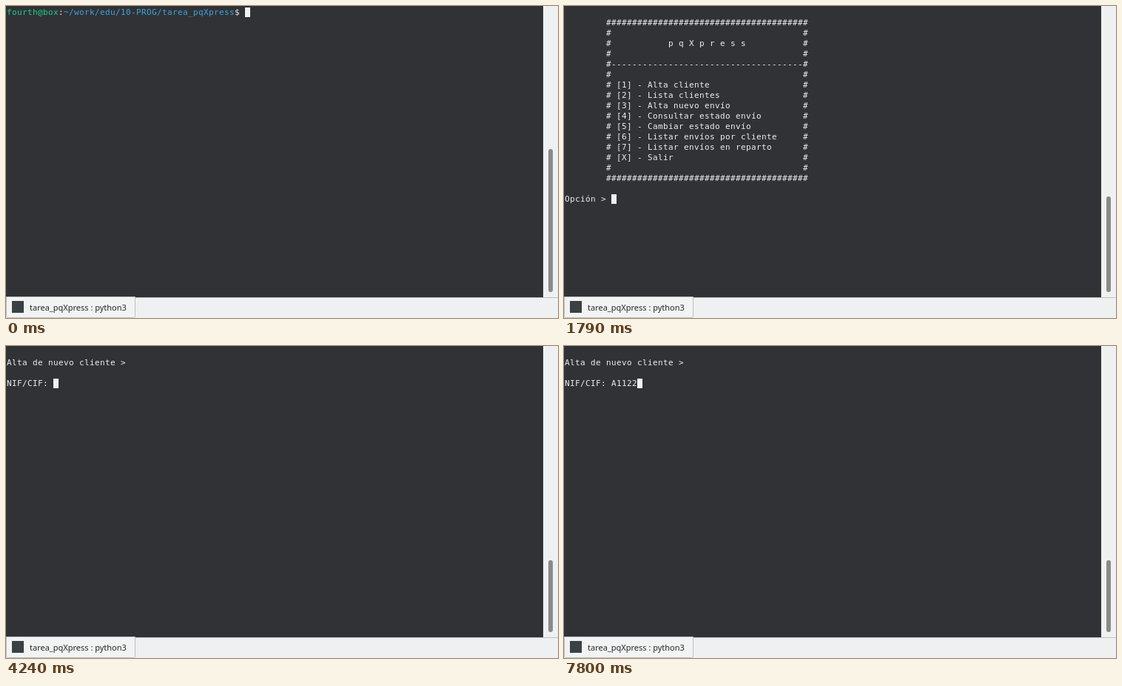
An HTML page with a canvas for the animation above (8000 ms loop, 746 px wide and 421 px high).

```html
<!DOCTYPE html>
<html lang="es">
<head>
<meta charset="utf-8">
<title>Terminal</title>
<style>
html, body { margin: 0; width: 100%; height: 100%; overflow: hidden; }
canvas { display: block; }
</style>
</head>
<body>
<canvas id="stage" width="746" height="421"></canvas>
<script>
const ctx = document.getElementById('stage').getContext('2d');
const LOOP = 8000, CELL = 7, ROW = 14;
const TEXT = '#eeeeee', GREEN = '#22cf93', BLUE = '#3da5dc', PANEL = '#eff0f1';

const user = 'fourth@box';
const path = '~/work/edu/10-PROG/tarea_pqXpress';
const prompt = `${user}:${path}$ `;
const command = prompt + 'java -cp target/classes/ paqxpress.test.ConsoleApp';

const boxed = (s = '') => ' '.repeat(8) + '#' + s.padEnd(37) + '#';
const border = boxed('#'.repeat(37));
const options = ['Alta cliente', 'Lista clientes', 'Alta nuevo envío',
  'Consultar estado envío', 'Cambiar estado envío',
  'Listar envíos por cliente', 'Listar envíos en reparto', 'Salir'];
const menu = ['', border, boxed(), boxed(' '.repeat(11) + 'p q X p r e s s'), boxed(),
  boxed('-'.repeat(37)), boxed(),
  ...options.map((name, i) => boxed(` [${i < 7 ? i + 1 : 'X'}] - ${name}`)),
  boxed(), border, '', 'Opción > '].join('\n');
const form = '\nAlta de nuevo cliente >\n\nNIF/CIF: ';

// [start ms, screen text, top of scrollbar handle]
const screens = [
  [0, prompt, 193],
  [500, command, 193],
  [1710, command + '\n', 193],
  [1790, menu, 257],
  [3600, menu + '1', 257],
  [4240, form, 289],
  [6530, form + 'A', 289],
  [7020, form + 'A1', 289],
  [7160, form + 'A11', 289],
  [7620, form + 'A112', 289],
  [7800, form + 'A1122', 289]
];

function rect(color, x, y, w, h) {
  ctx.fillStyle = color;
  ctx.fillRect(x, y, w, h);
}

function promptColor(col) {
  if (col < user.length) return GREEN;
  const start = user.length + 1;
  return col >= start && col < start + path.length ? BLUE : TEXT;
}

function drawTerminal(text) {
  rect('#303236', 0, 0, 726, 393);
  ctx.font = '11px "DejaVu Sans Mono", monospace';
  const lines = text.split('\n');
  lines.forEach((line, row) => {
    const hasPrompt = line.startsWith(prompt);
    [...line].forEach((char, col) => {
      ctx.fillStyle = hasPrompt ? promptColor(col) : TEXT;
      ctx.fillText(char, 1 + col * CELL, 12 + row * ROW);
    });
  });
  const last = lines.length - 1;
  rect('#f2f2f2', 1 + lines[last].length * CELL, 2 + last * ROW, CELL, 13);
}

function drawChrome(handleTop) {
  rect(PANEL, 726, 0, 20, 393);
  ctx.fillStyle = '#8a8a8b';
  ctx.beginPath();
  ctx.roundRect(733, handleTop, 6, 386 - handleTop, 3);
  ctx.fill();

  rect(PANEL, 0, 393, 746, 28);
  rect('#bcbebf', 175, 393, 571, 1);
  ctx.fillStyle = '#f2f3f3';
  ctx.strokeStyle = '#bcbebf';
  ctx.beginPath();
  ctx.roundRect(0.5, 392.5, 174, 28, [0, 0, 2, 2]);
  ctx.fill();
  ctx.stroke();
  rect('#3a4144', 8, 398, 16, 16);
  ctx.fillStyle = '#232629';
  ctx.font = '11px "Noto Sans", sans-serif';
  ctx.fillText('tarea_pqXpress : python3', 32, 411);
}

function draw(now) {
  const time = now % LOOP;
  const [, text, handleTop] = screens.findLast(([start]) => start <= time);
  drawTerminal(text);
  drawChrome(handleTop);
  requestAnimationFrame(draw);
}
draw(0);
</script>
</body>
</html>
```
